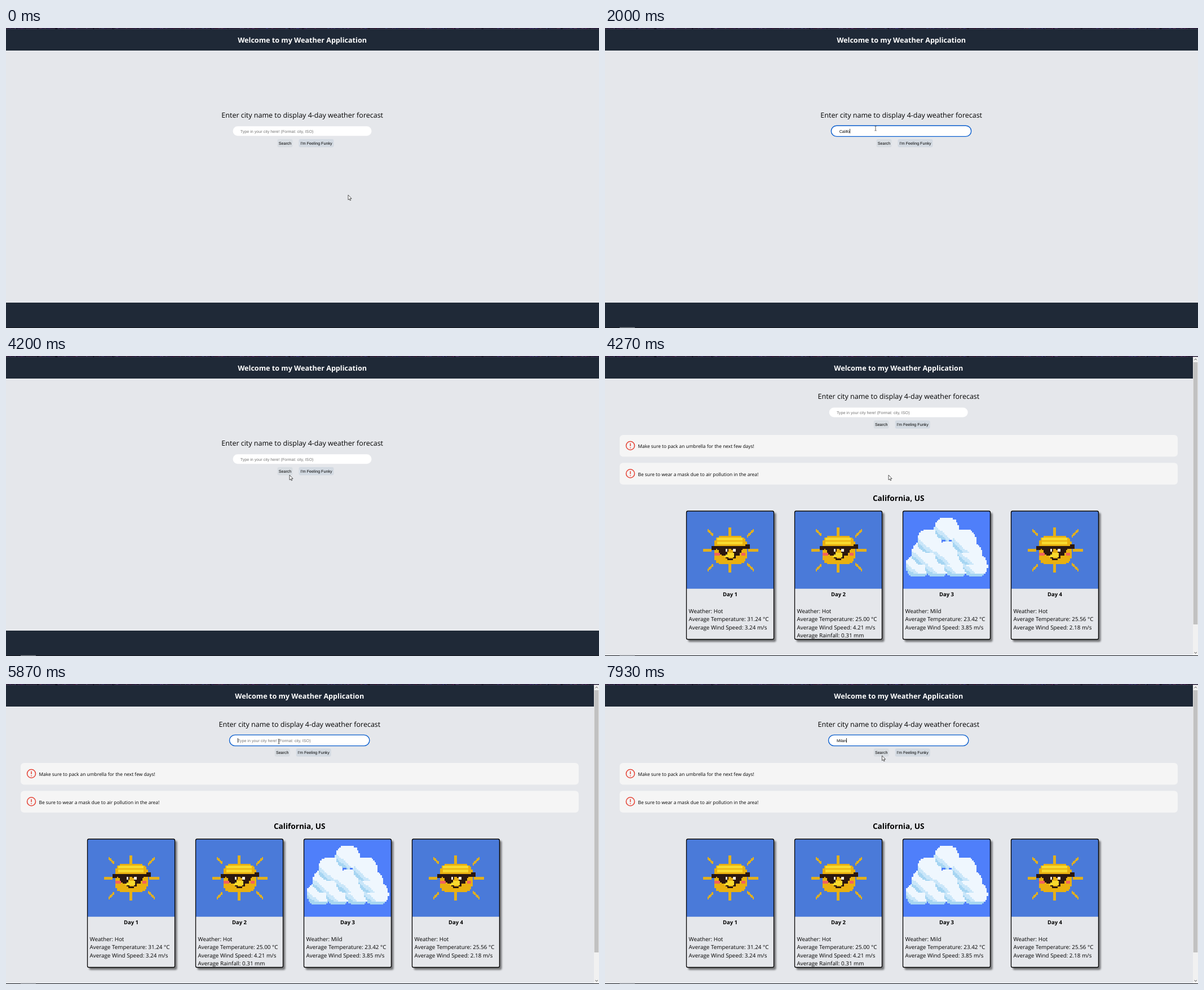
Write an HTML page that moves like this. It is 1052 px wide and 532 px high and loops after 8000 ms.

```html
<!DOCTYPE html>
<html lang="en">
<head>
<meta charset="utf-8">
<title>Weather Application</title>
<style>
  html, body { margin: 0; width: 100%; height: 100%; overflow: hidden; background: #e5e7eb; }
  svg { display: block; width: 100vw; height: 100vh; }
  text { font-family: "Open Sans", "Noto Sans", sans-serif; text-rendering: geometricPrecision; white-space: pre; }
  .ui { font-family: "Liberation Sans", Arial, sans-serif; font-size: 7.15px; }
  .bold { font-weight: 700; }
  .mid { text-anchor: middle; }
</style>
</head>
<body>
<svg id="stage" viewBox="0 0 1052 532" preserveAspectRatio="none"></svg>
<script>
const LOOP = 8000, STEP = 200 / 3;
const NAVY = '#1f2937', PAGE = '#e5e7eb';
const { abs, hypot, floor, min, max } = Math;

const rect = (x, y, w, h, fill, extra = '') =>
  `<rect x="${x}" y="${y}" width="${w}" height="${h}" fill="${fill}" ${extra}/>`;
const text = (x, y, size, str, cls = '', fill = '#000', extra = '') =>
  `<text x="${x}" y="${y}" font-size="${size}" class="${cls}" fill="${fill}" ${extra}>${str}</text>`;

function random(seed) {
  return () => (seed = (seed * 16807) % 2147483647) / 2147483647;
}

// Sliver of wallpaper above the page
function wallpaper() {
  const rnd = random(77), tints = ['#3a1d5c', '#57203f', '#26306e', '#0b0714', '#4a2a6a'];
  let out = rect(0, 0, 1052, 1.6, '#160d26');
  for (let i = 0; i < 230; i++) {
    out += rect((rnd() * 1052).toFixed(1), rnd() < .5 ? 0 : .8, (1 + rnd() * 3).toFixed(1), .8,
      tints[floor(rnd() * tints.length)]);
  }
  return out;
}

// Pixel art: samples colorAt(dx, dy) around a centre
function pixels(cx, cy, halfW, halfH, cell, colorAt) {
  let out = '<g shape-rendering="crispEdges">';
  for (let y = -halfH; y < halfH; y += cell) {
    for (let x = -halfW; x < halfW; x += cell) {
      const fill = colorAt(x + cell / 2, y + cell / 2);
      if (fill) out += rect((cx + x).toFixed(1), (cy + y).toFixed(1), cell + .1, cell + .1, fill);
    }
  }
  return out + '</g>';
}

function sunColor(x, y) {
  const ax = abs(x), ay = abs(y), lens = ax - 12;
  if (abs(y + 5 + x * .04) < 2.7 && ax < 34) return '#2b180f';
  if (y > -4 && y < 10 && abs(lens) < 11 - .55 * (y + 3))
    return abs(lens + 5) < 1.6 && abs(y) < 1.6 ? '#f4ead8' : '#2b180f';
  if ((ax / 29) ** 4 + (ay / 25.5) ** 4 < 1) {
    if (ax > 19 && ax < 27 && y > 4 && y < 11) return '#f2635c';
    if (ax < 8.5 && abs(y - 16 + x * x * .05) < 1.5) return '#2b180f';
    const shine = y < -7 ? floor((y + 26) / 4) % 2 && ax < 22 : ax < 10 && y > 4 && y < 13;
    return shine ? '#f8d92e' : '#e9b010';
  }
  const straight = min(ax, ay) < 2.2 && max(ax, ay + 8) > 33;
  const slanted = ax > 30 && ax < 41 && abs(ax - ay - 5) < 2.8;
  return straight || slanted ? '#e3b01c' : null;
}

// Rows of puffs widening downwards, upper rows in front
const puffs = [];
for (let row = 3; row >= 0; row--)
  for (let j = 0; j <= row; j++)
    puffs.push([row && (j / row - .5) * (42 + 20 * row), 22 * row - 33]);

function cloudColor(x, y) {
  const r = 21.5, p = puffs.filter(([a, b]) => hypot(x - a, y - b) < r).pop();
  if (!p) return null;
  const shade = ((y - p[1]) * .75 - (x - p[0]) * .66) / r;
  return shade > .72 || y > 48 ? '#a6d5f2' : shade > .45 ? '#c9e6f9' : '#eff7fe';
}

const sky = fill => rect(145, 275.5, 154, 137.2, fill);
const art = {
  Hot: sky('#4a7ad9') + pixels(222, 344, 48, 40, 2.5, sunColor),
  Mild: sky('#4f7ffa') + pixels(222, 339, 72, 52, 2.6, cloudColor),
};

function card(i, kind, temp, wind, rain) {
  const lines = [`Weather: ${kind}`, `Average Temperature: ${temp} °C`, `Average Wind Speed: ${wind} m/s`];
  if (rain) lines.push(`Average Rainfall: ${rain} mm`);
  return `<g transform="translate(${i * 192})">` +
    rect(147.5, 278, 156, 229, '#000', 'rx="3" opacity=".48" filter="url(#soft)"') +
    rect(144, 274.5, 156, 228.5, PAGE, 'rx="3"') + art[kind] +
    rect(144.5, 275, 155, 227.5, 'none', 'rx="2.6" stroke="#000" stroke-width="1.3"') +
    text(222, 426, 9.5, `Day ${i + 1}`, 'bold mid') +
    lines.map((s, n) => text(148.5, 456 + n * 14.3, 9.85, s)).join('') + '</g>';
}

function notice(y, str) {
  return rect(26, y, 990, 38.5, '#f5f5f5', 'rx="6"') +
    `<g transform="translate(45 ${y + 19})" stroke="#e5493c" fill="none" stroke-width="1.6">
      <circle r="7.5"/><path d="M0-4.2V1M0 3V4.6"/></g>` +
    text(58.5, y + 23, 8.38, str);
}

const button = (x, w, fill, str) =>
  rect(x, 197, w, 14.5, fill, 'rx="3"') + text(x + w / 2, 206.8, 7.15, str, 'ui mid');

const stage = document.getElementById('stage');
stage.innerHTML = `
  <defs><filter id="soft" x="-10%" y="-10%" width="120%" height="120%"><feGaussianBlur stdDeviation="1.8"/></filter></defs>
  ${rect(0, 0, 1052, 532, PAGE)}
  ${rect(0, 1.5, 1052, 38.5, NAVY)}
  ${wallpaper()}
  <g id="home">${rect(0, 487, 1052, 45, NAVY)}</g>
  <g id="result">
    ${notice(140, 'Make sure to pack an umbrella for the next few days!')}
    ${notice(189.5, 'Be sure to wear a mask due to air pollution in the area!')}
    ${text(520.7, 256.5, 13.6, 'California, US', 'bold mid')}
    ${card(0, 'Hot', '31.24', '3.24')}
    ${card(1, 'Hot', '25.00', '4.21', '0.31')}
    ${card(2, 'Mild', '23.42', '3.85')}
    ${card(3, 'Hot', '25.56', '2.18')}
    ${rect(1043, 1.5, 9, 529.5, '#f1f1f1')}
    ${rect(1043.7, 11, 7.6, 465, '#c1c1c1')}
    <path d="M1045.5 7.3l2.2-2.4 2.2 2.4M1045.5 525l2.2 2.4 2.2-2.4" fill="none" stroke="#505050"/>
  </g>
  <g id="title">${text(525.6, 26.2, 12.6, 'Welcome to my Weather Application', 'bold mid', '#fff')}</g>
  <g id="form">
    ${text(525.7, 159, 12.5, 'Enter city name to display 4-day weather forecast', 'mid')}
    ${rect(402.5, 174.3, 246, 17, '#fff', 'rx="8.5"')}
    ${rect(401.3, 173.2, 248.4, 19.2, '#fff', 'id="ring" rx="9.6" stroke="#0b5fce" stroke-width="1.4"')}
    ${text(415.7, 185.5, 7.15, 'Type in your city here! (Format: city, ISO)', 'ui', '#757575', 'id="hint"')}
    ${text(415.7, 185.5, 7.15, '', 'ui', '#000', 'id="typed"')}
    ${rect(0, 178.8, .8, 8, '#000', 'id="caret"')}
    ${button(481.5, 27, '#d8dde2', 'Search')}
    ${button(519.5, 62, '#d3dae2', 'I\'m Feeling Funky')}
  </g>
  ${rect(0, 531, 1052, 1, '#14171d')}
  ${rect(26, 530.7, 27, 1.3, '#777b82', 'id="tab"')}
  <path id="arrow" d="M0 0V8.8L2 7 3.3 10 4.7 9.4 3.4 6.5H6.1Z" fill="#fff" stroke="#222" stroke-width=".75" stroke-linejoin="round"/>
  <path id="beam" d="M-1.6-4H-.4L0-3.6 .4-4H1.6M0-3.6V3.6M-1.6 4H-.4L0 3.6 .4 4H1.6" fill="none" stroke="#333" stroke-width=".8"/>`;

const el = id => document.getElementById(id);
const show = (id, on) => el(id).setAttribute('display', on ? 'inline' : 'none');
const move = (id, x, y) => el(id).setAttribute('transform', `translate(${x} ${y})`);
const clamp = (v, lo, hi) => max(lo, min(hi, v));

// Pointer moves: start, end, destination
const moves = [
  [0, 530, 480, 178],      // to the field
  [2660, 2930, 526, 224],  // aside
  [3600, 3850, 498, 206],  // to Search
  [4000, 4180, 503, 211],
  [4470, 4850, 515, 348],  // over the cards
  [5000, 5550, 484, 102],  // back to the field
  [7200, 7800, 491.5, 127],
];

function pointer(t) {
  return moves.reduce(([x, y], [from, to, tx, ty]) => {
    const u = clamp((t - from) / (to - from), 0, 1), k = u * u * (3 - 2 * u);
    return [x + (tx - x) * k, y + (ty - y) * k];
  }, [607, 296]);
}

// One entry per focus of the field
const entries = [
  { from: 530, to: 3870, word: 'California', start: 1400, gap: 103 },
  { from: 5590, to: LOOP, word: 'Milan', start: 6333, gap: 116 },
];

function draw(t) {
  const found = t >= 4255;
  show('home', !found);
  show('result', found);
  show('tab', t > 60);
  move('title', found ? -4.8 : 0, 0);
  move('form', found ? -4.8 : 0, found ? -82.8 : 0);

  const entry = entries.find(e => t >= e.from && t < e.to);
  let word = '', caret = false;
  if (entry) {
    const n = clamp(floor((t - entry.start) / entry.gap) + 1, 0, entry.word.length);
    word = entry.word.slice(0, n);
    const last = n ? entry.start + (n - 1) * entry.gap : entry.from;
    caret = (t - last) % 1060 < 530;
  }
  el('typed').textContent = word;
  show('hint', !word);
  show('ring', entry);
  show('caret', caret);
  el('caret').setAttribute('x', 415.7 + (word ? el('typed').getComputedTextLength() : 0));

  const [x, y] = pointer(t);
  const top = found ? 91.5 : 174.5, left = found ? 398 : 403;
  const inField = y > top && y < top + 17 && x > left && x < left + 246;
  show('arrow', !inField);
  show('beam', inField);
  move(inField ? 'beam' : 'arrow', x.toFixed(1), y.toFixed(1));
}

function tick() {
  const t = performance.now() % LOOP;
  draw(floor((t + 4) / STEP) * STEP % LOOP);
  requestAnimationFrame(tick);
}
tick();
</script>
</body>
</html>
```
